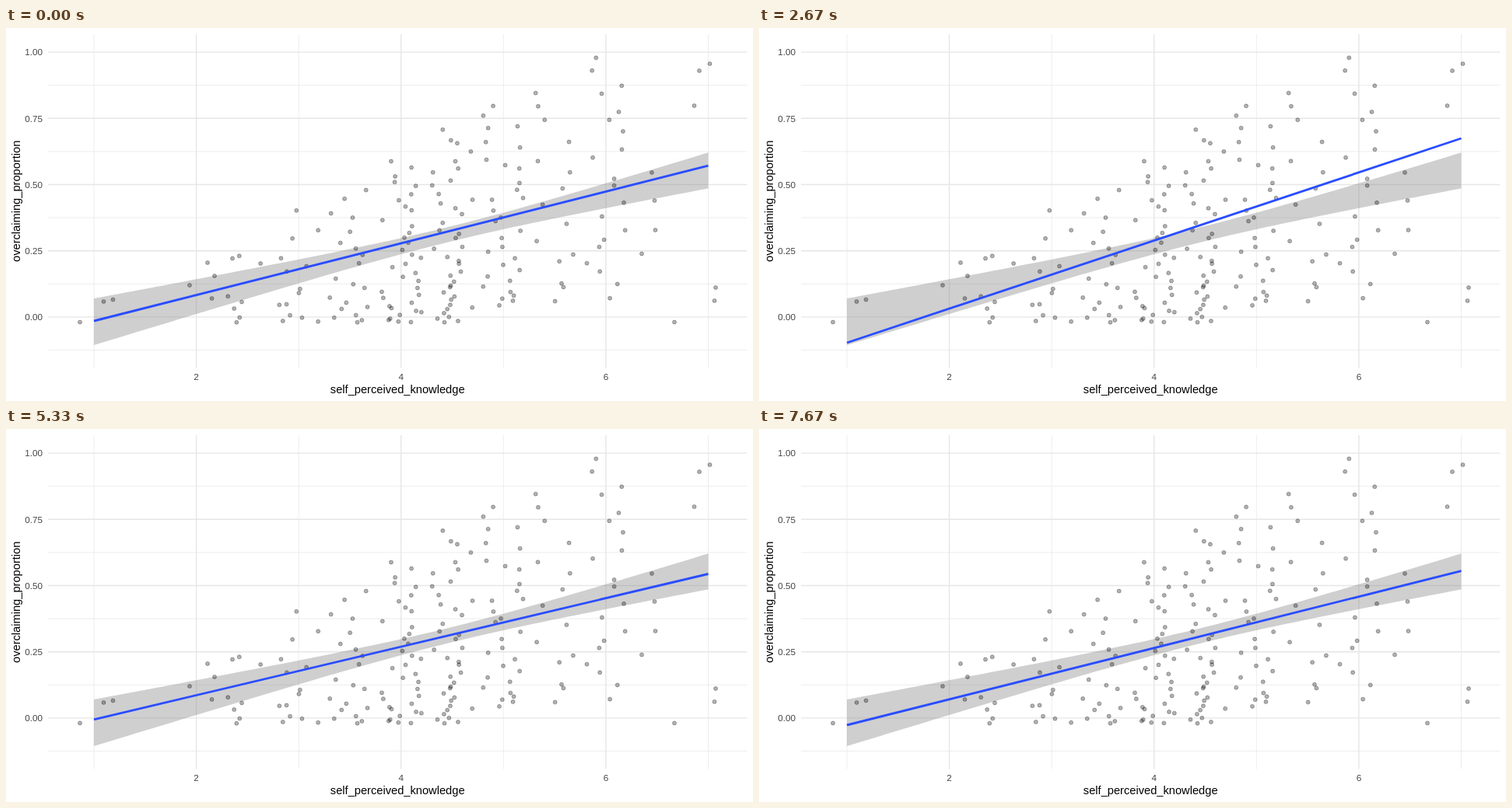
Write an HTML page that moves like this. It is 960 px wide and 480 px high and loops after 8000 ms.

```html
<!DOCTYPE html>
<html lang="en">
<head>
<meta charset="utf-8">
<title>Fitted line draws</title>
<style>
  html, body { margin: 0; width: 100%; height: 100%; overflow: hidden; background: #fff; }
  svg { display: block; width: 960px; height: 480px; }
  text { font-family: "Liberation Sans", Arial, sans-serif; font-size: 14.67px; text-anchor: middle; }
  .tick { font-size: 11.73px; fill: #444; }
  .end { text-anchor: end; }
  .major, .minor { stroke: #e6e6e6; stroke-width: 1.42; }
  .minor { stroke-width: .71; }
  .dot { fill: #000; fill-opacity: .3; stroke: #000; stroke-opacity: .3; stroke-width: .95; }
  #fit { stroke: #2a4dff; stroke-width: 2.85; }
</style>
</head>
<body>
<svg viewBox="0 0 960 480">
  <g id="grid"></g>
  <path id="band" fill="#878787" fill-opacity=".4"/>
  <g id="dots"></g>
  <line id="fit"/>
  <g id="labels"></g>
</svg>
<script>
const PANEL = { left: 54, right: 952.5, top: 8, bottom: 437.5 };
const X1 = 113, X7 = 902.5, LOOP = 8000;
const px = v => X1 + (v - 1) * (X7 - X1) / 6;
const py = v => 371.9 - v * 340.8;
const $ = id => document.getElementById(id);

function add(parent, tag, attrs, text) {
  const el = document.createElementNS("http://www.w3.org/2000/svg", tag);
  for (const key in attrs) el.setAttribute(key, attrs[key]);
  if (text) el.textContent = text;
  $(parent).append(el);
}

function drawAxes() {
  const vertical = (v, cls) => add("grid", "line",
    { x1: px(v), x2: px(v), y1: PANEL.top, y2: PANEL.bottom, class: cls });
  const horizontal = (v, cls) => add("grid", "line",
    { x1: PANEL.left, x2: PANEL.right, y1: py(v), y2: py(v), class: cls });

  [1, 3, 5, 7].forEach(v => vertical(v, "minor"));
  for (let i = 0; i < 5; i++) horizontal(i / 4 - .125, "minor");
  for (const v of [2, 4, 6]) {
    vertical(v, "major");
    add("labels", "text", { x: px(v), y: 453, class: "tick" }, String(v));
  }
  for (let i = 0; i < 5; i++) {
    horizontal(i / 4, "major");
    add("labels", "text", { x: 47, y: py(i / 4) + 4.2, class: "tick end" }, (i / 4).toFixed(2));
  }
  add("labels", "text", { x: 503.2, y: 470 }, "self_perceived_knowledge");
  add("labels", "text", { transform: "translate(17.8 222.8) rotate(-90)" }, "overclaiming_proportion");
}

// Confidence band: its half-width grows with the distance from the mean of x
function drawBand() {
  const upper = [], lower = [], steps = 79;
  for (let i = 0; i <= steps; i++) {
    const x = X1 + (X7 - X1) * i / steps;
    const mid = 378.1 - 194.7 * i / steps;
    const half = .0624 * Math.hypot(156, x - 567.5);
    upper.push(`${x},${mid - half}`);
    lower.unshift(`${x},${mid + half}`);
  }
  $("band").setAttribute("d", `M${upper.concat(lower).join("L")}Z`);
}

function seeded(seed) {
  return () => (seed = (seed * 16807) % 2147483647) / 2147483647;
}

// Isolated points at both ends of the scale: x, y
const ISOLATED = [
  [95, 378.5], [125.5, 352], [137.5, 349.5], [236, 331], [259, 302], [268, 319],
  [264.5, 348], [291, 296.5], [303, 352.5], [817, 290.5], [830, 186], [833.5, 222],
  [834.5, 260], [859, 378.5], [884.5, 100], [891, 55], [904.5, 46], [912, 334], [910.5, 351]
];

// Number of answers at 2.5, 3, 3.5 … 6
const COUNTS = [6, 14, 20, 36, 39, 31, 15, 20];

function drawDots() {
  const dot = (x, y) => add("dots", "circle", { cx: x, cy: y, r: 2.5, class: "dot" });
  const random = seeded(2024);
  ISOLATED.forEach(([x, y]) => dot(x, y));
  COUNTS.forEach((count, c) => {
    const level = 2.5 + c / 2;
    const low = level < 5 ? -.02 : .04;
    const high = .2 * level - .19;
    const skew = 2.6 - .26 * level;
    for (let i = 0; i < count; i++) {
      const q = (i + random()) / count;
      dot(px(level + (random() - .5) * .4), py(low + (high - low) * q ** skew));
    }
  });
}

// Sampled fits: y at the left end, y at the right end
const FITS = [
  [377, 177.2], [403, 171], [380, 185], [388, 176], [389, 182], [379, 179.6],
  [389, 156], [378, 183], [405, 142], [379, 178], [380.5, 188.7], [367, 188],
  [366, 191], [390.5, 183.9], [374, 193], [371, 196], [373.8, 186.5], [382, 184],
  [374, 195], [371, 198], [376.3, 191.2], [372, 193], [379, 163], [381, 182.6]
];
const startOf = i => Math.round(i * 100 / 3) * 10;

function render(time) {
  const t = time % LOOP;
  let i = FITS.length - 1;
  while (i > 0 && t < startOf(i)) i--;
  const [y1, y2] = FITS[i];
  const ends = { x1: X1, y1, x2: X7, y2 };
  for (const key in ends) $("fit").setAttribute(key, ends[key]);
}

drawAxes();
drawBand();
drawDots();
render(0);

const begin = performance.now();
function tick() {
  render(performance.now() - begin);
  requestAnimationFrame(tick);
}
requestAnimationFrame(tick);
</script>
</body>
</html>
```
